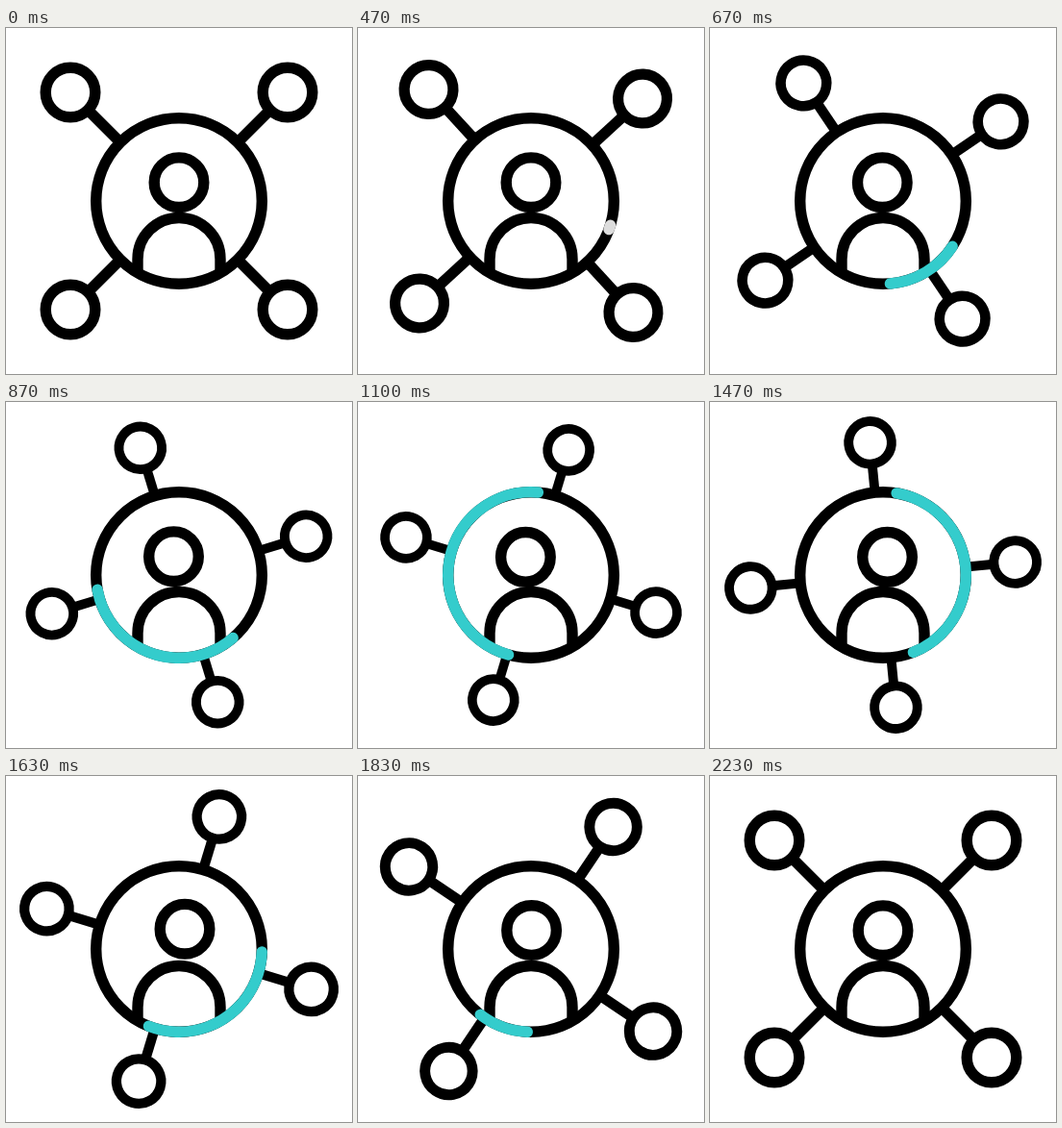
An HTML page with a canvas for the animation above (2500 ms loop, 360 by 360 pixels).

```html
<!DOCTYPE html>
<html lang="en">
<head>
<meta charset="utf-8">
<title>Network icon</title>
<style>
  html, body { margin: 0; width: 100%; height: 100%; overflow: hidden; background: #fff; }
  canvas { display: block; }
</style>
</head>
<body>
<canvas id="stage" width="360" height="360"></canvas>
<script>
const ctx = document.getElementById('stage').getContext('2d');
const FPS = 30, FRAMES = 75;
const RING = 86.3, STROKE = 11.4, SMALL = 25.8, REACH = 159.8;
const RAD = Math.PI / 180;

// Symmetric ease, the curve cubic-bezier(a, 0, 1 - a, 1)
function ease(u, a) {
  let lo = 0, hi = 1;
  for (let i = 0; i < 24; i++) {
    const s = (lo + hi) / 2, r = 1 - s;
    const x = 3 * a * s * r * r + 3 * (1 - a) * s * s * r + s ** 3;
    if (x < u) lo = s; else hi = s;
  }
  return lo * lo * (3 - 2 * lo);
}

// Eased progress from 0 to 1 between two frames
function move(f, start, end, a = .53) {
  const u = (f - start) / (end - start);
  return u <= 0 ? 0 : u >= 1 ? 1 : ease(u, a);
}

function circle(x, y, r) {
  ctx.beginPath();
  ctx.arc(x, y, r, 0, 2 * Math.PI);
  ctx.stroke();
}

function drawNodes(f) {
  const scale = 1 - .15 * (move(f, 8, 32) - move(f, 36, 67));
  const dist = REACH * scale, r = SMALL * scale;
  ctx.save();
  ctx.translate(180, 180);
  ctx.rotate((45 + 180 * move(f, 8, 67)) * RAD);
  ctx.lineWidth = STROKE * scale;
  for (let i = 0; i < 4; i++) {
    ctx.beginPath();
    ctx.moveTo(RING, 0);
    ctx.lineTo(dist - r, 0);
    ctx.stroke();
    circle(dist, 0, r);
    ctx.rotate(Math.PI / 2);
  }
  ctx.restore();
}

function drawPerson(f) {
  // The head leans left, then right, then settles
  const back = move(f, 49, 57);
  const x = -5.8 * move(f, 17, 28) + 11.8 * move(f, 31, 49) - 6 * back;
  const y = 2 * move(f, 28, 40) - 3.5 * move(f, 40, 49) + 1.5 * back;
  circle(180 + x, 160.7 + y, SMALL);
  ctx.beginPath();
  ctx.moveTo(137, 254);
  ctx.arc(180, 240.5, 43, Math.PI, 0);
  ctx.lineTo(223, 254);
  ctx.stroke();
}

// One turn around the ring: the tail chases the head while both drift
function drawArc(f) {
  if (f < 14 || f >= 60) return;
  const drift = 17 + 2.7 * (f - 14);
  const head = drift + 360 * move(f, 12.7, 49, .2);
  const tail = drift + 360 * move(f, 27.8, 60, .2);
  ctx.save();
  ctx.strokeStyle = f < 15 ? '#ddd' : '#34cccc';
  ctx.lineCap = 'round';
  ctx.beginPath();
  ctx.arc(180, 180, RING, tail * RAD, head * RAD);
  ctx.stroke();
  ctx.restore();
}

function draw() {
  const f = Math.floor(performance.now() * FPS / 1000 + .2) % FRAMES;
  ctx.fillStyle = '#fff';
  ctx.fillRect(0, 0, 360, 360);
  ctx.strokeStyle = '#000';
  ctx.lineWidth = STROKE;
  drawNodes(f);
  drawPerson(f);
  circle(180, 180, RING);
  drawArc(f);
  requestAnimationFrame(draw);
}

draw();
</script>
</body>
</html>
```
